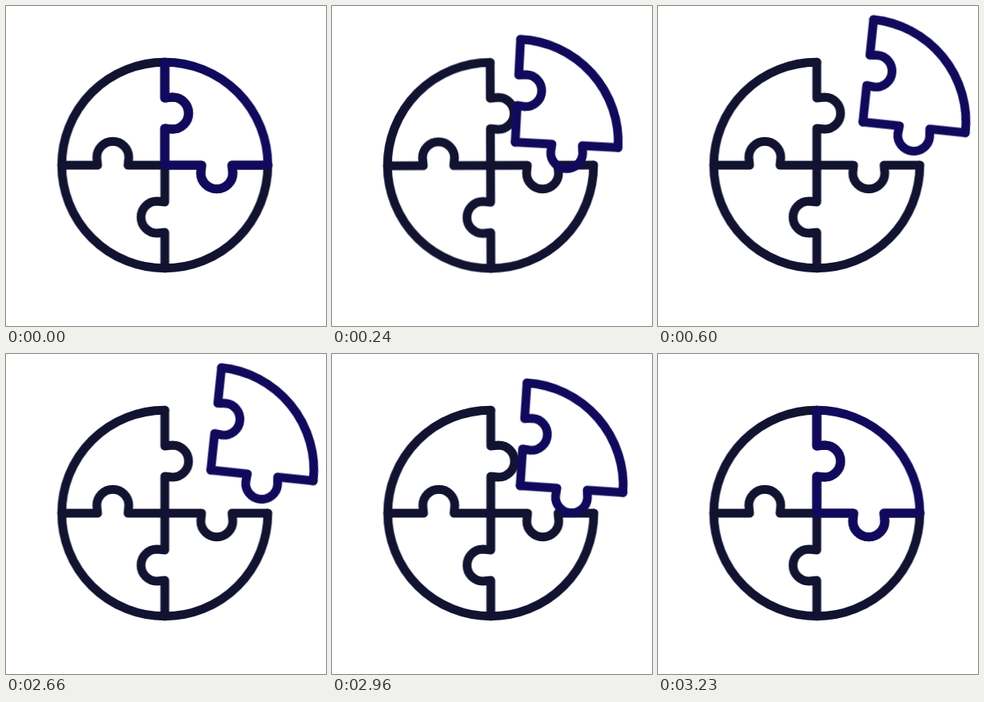
An HTML page that plays this animation: 400 px wide and 400 px high, repeating every 4.26 s.

```html
<!DOCTYPE html>
<html lang="en">
<head>
<meta charset="utf-8">
<title>Puzzle circle</title>
<style>
  html, body { margin: 0; height: 100%; overflow: hidden; background: #fff; }
  svg { display: block; width: 100%; height: 100%; }
  g { fill: none; stroke-width: 11; stroke-linecap: round; stroke-linejoin: round; }
  #ring { stroke: #121331; }
  #piece { stroke: #110a5c; }
</style>
</head>
<body>
<svg viewBox="0 0 400 400">
  <defs>
    <!-- one spoke with its tab, running right from the centre -->
    <path id="edge" d="M0 0H46L45 9.7A20 20 0 0 0 85 9.7L84 0H128.8"/>
  </defs>
  <g transform="translate(198.5 199)">
    <g id="ring">
      <path d="M0-128.8A128.8 128.8 0 1 0 128.8 0"/>
      <use href="#edge"/>
      <use href="#edge" transform="rotate(90)"/>
      <use href="#edge" transform="rotate(180)"/>
      <use href="#edge" transform="rotate(270)"/>
      <g id="piece">
        <path d="M0-128.8A128.8 128.8 0 0 1 128.8 0"/>
        <use href="#edge"/>
        <use href="#edge" transform="rotate(270)"/>
      </g>
    </g>
  </g>
</svg>
<script>
  const LOOP = 4260, MOVE = 600, RETURN = 2630, STEP = 30;
  const REST = 'translate(0px, 0px) rotate(0deg)';

  // steps: [time, transform, easing to the next step]
  function track(id, steps) {
    const frames = steps.map(([time, transform, easing = 'linear']) =>
      ({ offset: time / MOVE, transform, easing }));
    const animation = document.getElementById(id)
      .animate(frames, { duration: MOVE, fill: 'both' });
    animation.pause();
    return animation;
  }

  const tracks = [
    track('ring', [
      [0, REST, 'cubic-bezier(.3, 0, .55, 1)'],
      [120, 'translate(-9.3px, 9.3px) rotate(-6deg)', 'cubic-bezier(.33, 0, .67, 1)'],
      [255, REST],
      [MOVE, REST]
    ]),
    track('piece', [
      [0, REST],
      [90, REST, 'cubic-bezier(.2, 0, .2, 1)'],
      [MOVE, 'translate(57.6px, -54px) rotate(6deg)']
    ])
  ];

  const snap = time => Math.min(MOVE, Math.floor(time / STEP) * STEP);

  // The piece leaves, waits, then runs the same move backwards.
  const pose = time => time < RETURN ? snap(time) : MOVE - snap(time - RETURN);

  const start = performance.now();
  function draw() {
    const time = (performance.now() - start) % LOOP;
    for (const animation of tracks) animation.currentTime = pose(time);
    requestAnimationFrame(draw);
  }
  draw();
</script>
</body>
</html>
```
